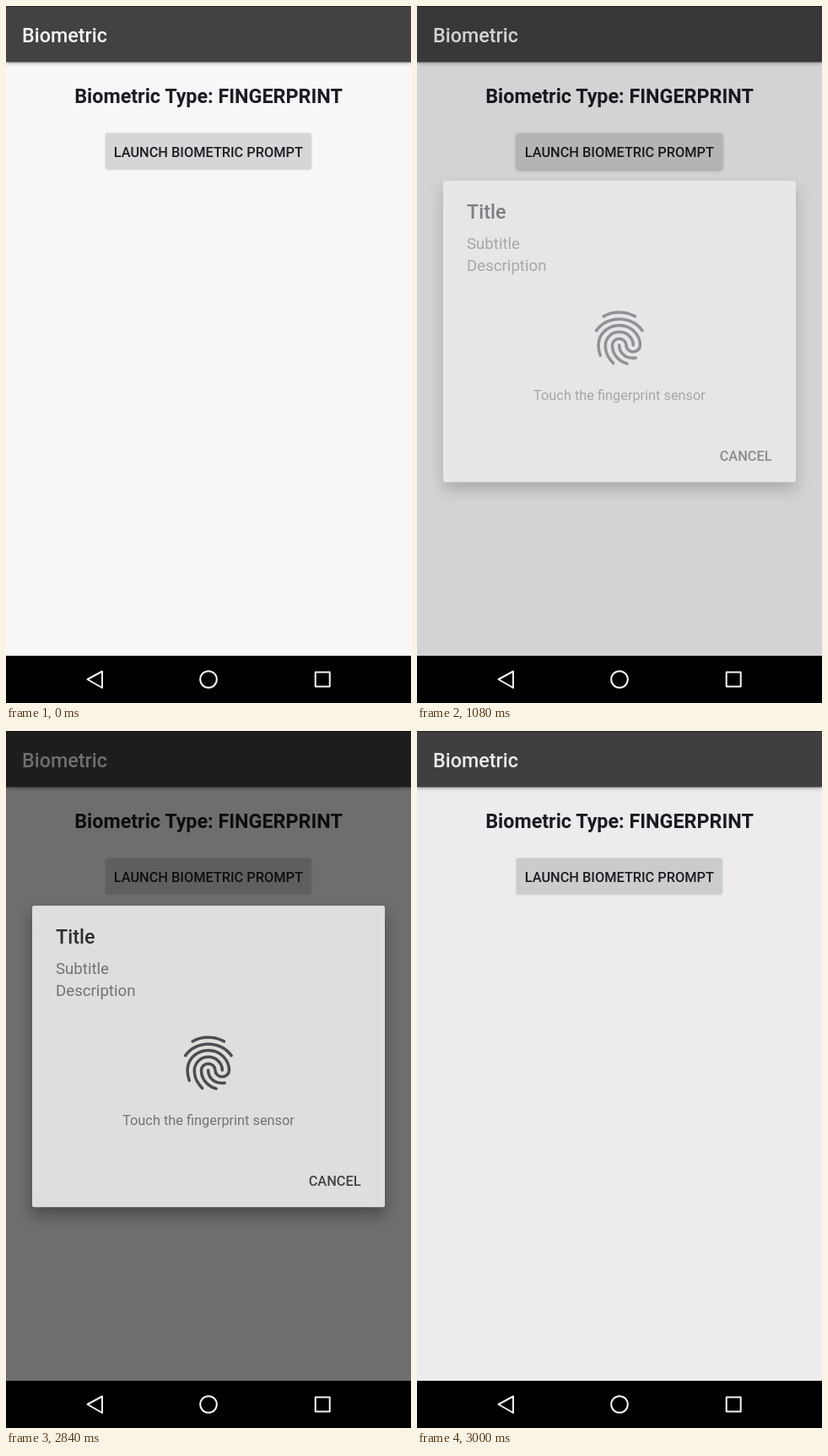
These frames come from a looping animation (480x826 px, 3.72 s). An HTML page:

```html
<!DOCTYPE html>
<html lang="en">
<head>
<meta charset="utf-8">
<title>Biometric prompt</title>
<style>
  html, body { margin: 0; width: 100%; height: 100%; overflow: hidden; background: #000; }
  svg { display: block; width: 100%; height: 100%; }
  text { font-family: Roboto, "Open Sans", sans-serif; fill: #1e1c21; }
  .title { font-size: 23.33px; font-weight: 500; }
  .body { font-size: 18.67px; fill: #757377; }
  .small { font-size: 16.33px; }
  .button { font-size: 16.33px; font-weight: 500; }
  .mid { text-anchor: middle; }
  .line { fill: none; stroke-linecap: round; stroke-linejoin: round; }
  #bar { filter: drop-shadow(0 1px 2px rgba(0, 0, 0, .4)); }
  #card { filter: drop-shadow(0 9px 9px rgba(0, 0, 0, .42)); }
</style>
</head>
<body>
<svg viewBox="0 0 480 826">
  <rect width="480" height="826" fill="#f9f7fa"/>
  <rect id="bar" width="480" height="66.5" fill="#434144"/>
  <rect width="480" height="1" fill="#28272a"/>
  <text class="title" x="19" y="42.5" style="fill:#f9f7fa">Biometric</text>
  <text class="title mid" x="240" y="114.5" style="font-weight:700">Biometric Type: FINGERPRINT</text>
  <rect id="launch" x="118" y="151" width="243.5" height="42.5" rx="2"/>
  <text class="button mid" x="239.8" y="178.5">LAUNCH BIOMETRIC PROMPT</text>

  <rect id="dim" width="480" height="770"/>

  <g id="dialog">
    <rect id="card" x="31" y="207" width="418" height="357.3" rx="2.5" fill="#fefdfe"/>
    <text class="title" x="59" y="252">Title</text>
    <text class="body" x="59" y="288">Subtitle</text>
    <text class="body" x="59" y="313.5">Description</text>
    <g class="line" transform="translate(201.4 355.1) scale(3.2)" stroke="#454348" stroke-width="1.1">
      <path d="M6.2 3.97C7.9 3 9.9 2.5 12 2.5s3.9.45 5.8 1.47"/>
      <path d="M3.5 9.22c1-1.4 2.2-2.4 3.6-3.1 3-1.55 6.8-1.55 9.8 0 1.4.7 2.6 1.7 3.6 3.1"/>
      <path d="M9.75 21.3c-.85-.85-1.27-1.4-1.92-2.53-.65-1.15-.99-2.58-.99-4.1 0-2.7 2.3-4.9 5.16-4.9s5.16 2.2 5.16 4.9"/>
      <path d="M11.94 14.66c0 1.58.8 3.07 2.16 3.98.78.52 1.7.8 2.82.8.3 0 .7-.03 1.13-.1"/>
      <path d="M14.91 21.5c-1.5-.4-2.45-.95-3.5-1.98-1.3-1.3-2.02-3-2.02-4.86 0-1.35 1.15-2.44 2.58-2.44s2.58 1.09 2.58 2.44 1.16 2.44 2.58 2.44 2.58-1.1 2.58-2.44c0-4.05-3.48-7.33-7.75-7.33-3.04 0-5.8 1.7-7.06 4.32-.42.88-.64 1.9-.64 3.01 0 1 .13 2.3.7 3.78"/>
    </g>
    <text class="small mid" x="240" y="467" style="fill:#757377">Touch the fingerprint sensor</text>
    <text class="button" x="358.7" y="538.5" style="fill:#39373b">CANCEL</text>
  </g>

  <rect y="770" width="480" height="56"/>
  <g class="line" stroke="#f4f4f4" stroke-width="2">
    <path d="M96.5 798L114 788.5V808Z"/>
    <circle cx="240" cy="798" r="9.8"/>
    <rect x="366.7" y="789.5" width="17" height="17"/>
  </g>
</svg>
<script>
  const LOOP = 3720, STEP = 40, SETTLED = 3000;
  const [launch, dim, dialog] = ["launch", "dim", "dialog"].map(id => document.getElementById(id));

  const ramp = (t, start, length) => Math.min(1, Math.max(0, (t - start) / length));
  const easeOut = x => 1 - (1 - x) ** 3;

  function draw(t) {
    t = Math.min(SETTLED, Math.floor(t / STEP) * STEP);

    const press = ramp(t, 860, 80) - ramp(t, 1020, 120);
    const tone = 214 - 4 * press;
    launch.style.fill = `rgb(${tone}, ${tone - 1}, ${tone + 1})`;
    launch.style.filter = `drop-shadow(0 ${.5 + 1.5 * press}px ${1 + 1.8 * press}px rgba(0, 0, 0, ${.25 + .15 * press}))`;

    dim.style.opacity = .6 * (ramp(t, 1033, 190) - ramp(t, 2825, 190));
    dialog.style.opacity = easeOut(ramp(t, 1045, 190)) - easeOut(ramp(t, 2826, 185));
  }

  const start = performance.now();
  function tick() {
    draw((performance.now() - start) % LOOP);
    requestAnimationFrame(tick);
  }
  tick();
</script>
</body>
</html>
```
